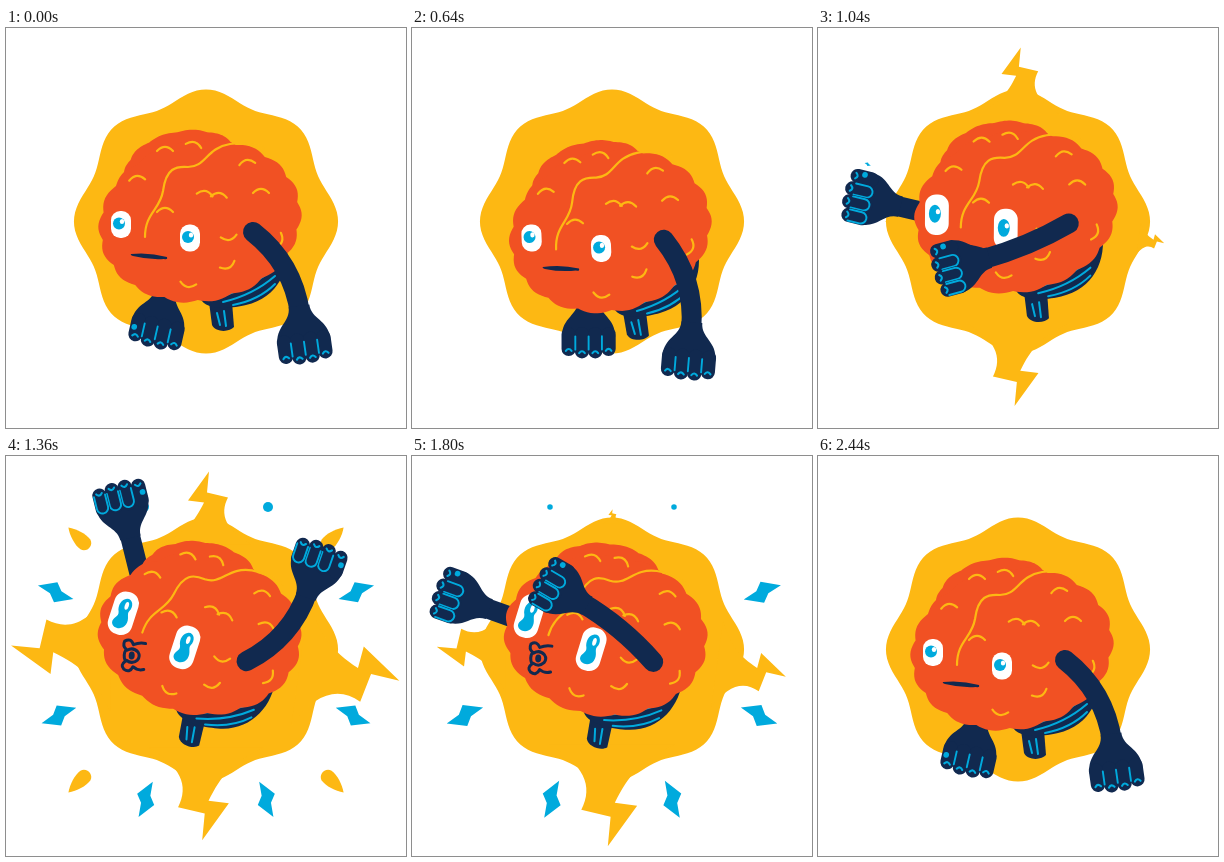
These frames come from a looping animation (400x400 px, 2.48 s). An HTML page with a canvas:

```html
<!DOCTYPE html>
<html lang="en">
<head>
<meta charset="utf-8">
<title>Brain power</title>
<style>
html, body { margin: 0; height: 100%; overflow: hidden; background: #fff; }
canvas { display: block; }
</style>
</head>
<body>
<canvas id="stage" width="400" height="400"></canvas>
<script>
const ctx = document.getElementById('stage').getContext('2d');
const LOOP = 2480, RAD = Math.PI / 180;
const YELLOW = '#fdb813', RED = '#f15123', NAVY = '#11294f', BLUE = '#00aadd';
const sin = deg => Math.sin(deg * RAD), cos = deg => Math.cos(deg * RAD);
const clamp = v => Math.min(1, Math.max(0, v));

// Poses: body x, y, turn, near arm angle, far arm angle (0 hangs down, 180 points up)
const rest = [0, 0, 0, -30, -7], cheer = [2, -14, 18, 221, 166];
const keys = [
  [0, rest],
  [340, [-5, 1, 7, 28, 46]],
  [440, [-4, 2, 6, 20, 39]],
  [640, [4, 10, -2.5, -17, -19]],
  [1040, [4, -9, 0.5, 67, 103]],
  [1250, cheer],
  [1660, cheer],
  [1800, [2, -12.5, 17, 130, 110]],
  [2240, rest],
  [LOOP, rest]
];

// Smooth curve through the poses that rests at every turning point
function poseAt(t) {
  const i = keys.findIndex(k => k[0] > t) - 1;
  const [t0, a] = keys[i], [t1, b] = keys[i + 1];
  const d = t1 - t0, u = (t - t0) / d;
  const slope = (k, j) => {
    const p = keys[k - 1], n = keys[k + 1], v = keys[k][1][j];
    if (!p || !n || (p[1][j] - v) * (n[1][j] - v) >= 0) return 0;
    return (n[1][j] - p[1][j]) / (n[0] - p[0]) * d;
  };
  return a.map((v, j) => v + (b[j] - v) * u * u * (3 - 2 * u)
    + slope(i, j) * u * (1 - u) ** 2 - slope(i + 1, j) * u * u * (1 - u));
}

// Springs out at start and draws back after end
const backIn = u => u * u * (2.7 * u - 1.7);
const pop = (t, start, end) =>
  1 - backIn(1 - clamp((t - start) / 150)) - backIn(clamp((t - end) / 200));

function fill(path, color) {
  ctx.fillStyle = color;
  ctx.fill(typeof path === 'string' ? new Path2D(path) : path);
}
function line(path, color, width) {
  ctx.strokeStyle = color;
  ctx.lineWidth = width;
  ctx.stroke(new Path2D(path));
}
function at(x, y, turn, scale, draw) {
  if (scale <= 0.01) return;
  ctx.save();
  ctx.translate(x, y);
  ctx.rotate(turn * RAD);
  ctx.scale(scale, scale);
  draw();
  ctx.restore();
}
function disc(x, y, rx, ry, color) {
  const p = new Path2D();
  p.ellipse(x, y, rx, ry, 0, 0, 7);
  fill(p, color);
}
function polar(x, y, rx, ry, tilt, radius) {
  const p = new Path2D();
  for (let a = 0; a < 360; a += 2) {
    const px = rx * radius(a) * cos(a), py = ry * radius(a) * sin(a);
    p.lineTo(x + px * cos(tilt) - py * sin(tilt), y + px * sin(tilt) + py * cos(tilt));
  }
  return p;
}

const blob = polar(200, 193.5, 126.5, 126.5, 0, a => 1 + .044 * cos(8 * a));
const bumps = n => a => .98 + .034 * Math.abs(sin(n * a / 2));
const nearLobe = polar(194, 193, 101, 80, -11, bumps(18));
const farLobe = polar(178, 142, 60, 39, -10, bumps(12));
const bigBolt = 'M-46 26C-20 14 -12 4 -2 -16L-18 -18L3 -47L1 -26L22 -21C13 -4 20 12 46 26Z';
const smallBolt = 'M19 0L2 -10L-5 -3L-19 0L-2 10L5 3Z';
const drop = 'M15 0C8 5 -2 8 -9 7C-16 5 -16 -5 -9 -7C-2 -8 8 -5 15 0Z';

// Big bolts: turn, size, start, end
const bolts = [[0, 1, 995, 1610], [98, 1.38, 1032, 1640], [180, 1.27, 997, 1716], [-90, 1.36, 1040, 1640]];

function drawBurst(t) {
  for (const [turn, size, start, end] of bolts)
    at(200 + 131 * sin(turn), 193.5 - 131 * cos(turn), turn, size * pop(t, start, end),
      () => fill(bigBolt, YELLOW));
  for (const side of [-1, 1]) {
    for (const v of [-1, 1])
      at(200 + 127 * side, 204 + 122 * v, Math.atan2(v, side) / RAD, pop(t, 1090, 1580),
        () => fill(drop, YELLOW));
    [-21, 24, 68].forEach((angle, i) => {
      const start = 1035 + 12 * (side < 0 ? i : 5 - i);
      at(200 + 161 * side * cos(angle), 194 + 161 * sin(angle), angle * side, pop(t, start, 1760), () => {
        ctx.scale(1, angle * side < 0 || (angle * side > 0 && side < 0) ? 1 : -1);
        if (side < 0 && angle < 0) ctx.scale(1, -1);
        fill(smallBolt, BLUE);
      });
    });
    at(200 + 62 * side, 51, 0, pop(t, 1110, 1630), () => disc(0, 0, 5, 5, BLUE));
  }
}

function drawHand(x, y, turn) {
  at(x, y, turn, .95, () => {
    fill('M-11 -8C-11 8 -28 10 -28 30L-26 42H26L28 30C28 10 11 8 11 -8Z', NAVY);
    for (let i = 0; i < 4; i++) {
      const fx = -21 + 14 * i, tip = 47 - 2.5 * Math.abs(i - 1.5);
      line(`M${fx} 28V${tip}`, NAVY, 15);
      line(`M${fx - 3} ${tip + 2}q3 -4 6 0`, BLUE, 2.2);
      if (i && turn > 18) line(`M${fx - 6} 43V30a6 6 0 0 1 12 0V43`, BLUE, 2);
      else if (i) line(`M${fx - 7} 30V44`, BLUE, 2);
    }
    if (turn > 8) disc(-24, 36, 3, 3, BLUE);
  });
}

function drawArm([x, y], angle, length, bend) {
  const wx = x - length * sin(angle), wy = y + length * cos(angle);
  const turn = angle + bend, reach = length / 2 / cos(bend);
  line(`M${x} ${y}Q${wx + reach * sin(turn)} ${wy - reach * cos(turn)} ${wx} ${wy}`, NAVY, 20);
  drawHand(wx, wy, turn);
}

function drawEye(x, y, h) {
  const w = 20 + (h - 27) * .28;
  const p = new Path2D();
  p.roundRect(x - w / 2, y - h / 2, w, h, w * .46);
  fill(p, '#fff');
  if (h > 42) {
    at(x, y, 0, 1, () => {
      fill('M-1 -15C5 -17 8 -9 5 -4C3 0 8 3 6 10C4 17 -6 18 -8 12C-9 7 -3 5 -5 0C-8 -6 -6 -13 -1 -15Z', BLUE);
      disc(1, -8, 2, 4, '#fff');
    });
  } else {
    disc(x - 2, y - 1, 6, 6 + (h - 27) * .22, BLUE);
    disc(x + 1, y - 3, 2.2, 2.6, '#fff');
  }
}

function drawMouth(open) {
  if (!open) {
    fill('M125 226Q143 224 161 229Q162 232 158 231Q143 232 127 228Q124 227 125 226Z', NAVY);
    return;
  }
  at(137, 234, -14, 1, () => {
    line('M12 -13Q6 -14 0 -11Q-3 -18 -9 -14Q-11 -9 -7 -6Q-10 0 -7 6Q-12 10 -8 14Q-2 18 1 11Q6 15 12 13' +
      'M-6 -5Q0 -9 5 -4Q8 0 5 4Q0 9 -6 5', NAVY, 3);
    disc(-1, 0, 3, 4, NAVY);
  });
}

function drawBrain() {
  fill('M203 274L206 297C210 305 224 304 228 299L226 274Z', NAVY);
  fill('M194 270C225 262 255 235 280 210C286 240 272 270 240 277C228 280 200 284 194 270Z', NAVY);
  for (let i = 0; i < 3; i++)
    line(`M${207 + 10 * i} ${271 + 3 * i}Q${241 + 6 * i} ${262 + 5 * i} 269 ${240 + 8 * i}`, BLUE, 2);
  line('M211 285L214 297M218 283L220 298', BLUE, 2);
  fill(farLobe, RED);
  fill(nearLobe, RED);
  line('M139 209C139 185 154 182 157 163C160 140 170 138 182 139C200 139 200 120 224 116Q242 113 258 120', YELLOW, 2.2);
  // Short creases: x, y, turn
  const creases = [
    [131, 150, -5], [159, 121, 0], [188, 116, 15], [241, 134, -8], [199, 165, 10], [213, 167, 5],
    [159, 182, 0], [223, 210, 170], [222, 238, 155], [182, 257, 190], [255, 163, 0], [274, 213, 110]
  ];
  for (const [x, y, turn] of creases)
    at(x, y, turn, 1, () => line('M-8 2Q0 -6 8 2', YELLOW, 2.2));
}

function draw(t) {
  const [bx, by, turn, near, far] = poseAt(t);
  const eye = 27 + 17 * clamp((near - 20) / 60);
  const onBody = (x, y) => [195 + bx + x * cos(turn) - y * sin(turn), 185 + by + x * sin(turn) + y * cos(turn)];
  ctx.clearRect(0, 0, 400, 400);
  ctx.lineCap = ctx.lineJoin = 'round';
  fill(blob, YELLOW);
  drawBurst(t);
  drawArm(onBody(-45, 20), far, 66 + .0014 * far * far, 20 * Math.max(0, cos(far)));
  at(195 + bx, 185 + by, turn, 1, () => {
    ctx.translate(-195, -185);
    drawBrain();
    drawEye(115, 196.5, eye);
    drawEye(184, 210, eye);
    drawMouth(eye > 42);
  });
  drawArm(onBody(52, 19), near, 94, 22 * cos(.72 * (near + 30)));
}

function tick() {
  draw(performance.now() % LOOP);
  requestAnimationFrame(tick);
}
tick();
</script>
</body>
</html>
```
